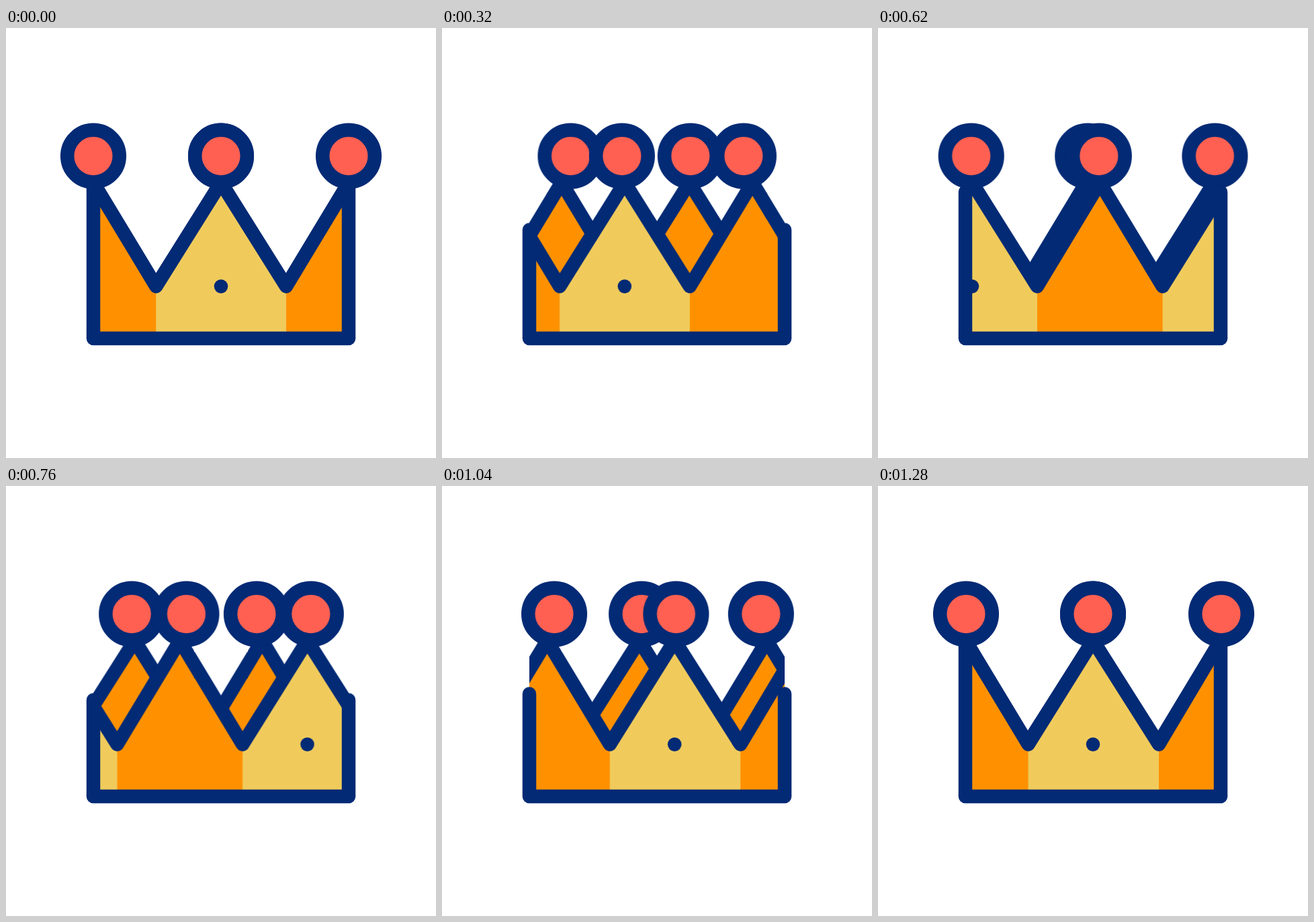
Recreate the animation shown at these times as an HTML page without scripts. Size 640 by 640 pixels, loop 1420 ms.

```html
<!DOCTYPE html>
<html lang="en">
<head>
<meta charset="utf-8">
<title>Turning crown</title>
<style>
  html, body { margin: 0; height: 100%; overflow: hidden; background: #fff; }
  svg { display: block; width: 100%; height: 100%; }
  .line { stroke: #032a75; stroke-width: 20.5; stroke-linecap: round; stroke-linejoin: round; }
  .orange { fill: #ff9100; }
  .yellow { fill: #f0cb5c; }
  .dot { fill: #032a75; }
  .ball { fill: #ff6052; }
  .none { fill: none; }

  /* the turn takes 1280 ms, then the crown rests */
  .band, .wall, .left, .right, .back, .front { animation: 1.42s infinite; }
  .band { animation-name: band; animation-timing-function: cubic-bezier(.43, 0, .57, 1); }
  .left, .right { animation-timing-function: cubic-bezier(.32, 0, .68, 1); }
  .left { animation-name: left; }
  .right { animation-name: right; }
  .back { animation-name: back; }
  .front { animation-name: front; }
  .wall { animation-name: wall; animation-timing-function: linear; }

  @keyframes band {
    from { transform: translateX(0); }
    90.14%, to { transform: translateX(-380px); }
  }
  @keyframes left {
    from { transform: translateX(130px); }
    90.14%, to { transform: translateX(511px); }
  }
  @keyframes right {
    from { transform: translateX(510px); }
    90.14%, to { transform: translateX(131px); }
  }
  /* middle balls leave at one end and come back from the other */
  @keyframes back {
    from { transform: translateX(320px); animation-timing-function: cubic-bezier(.46, 0, .7, .55); }
    45.07% { transform: translateX(510px); }
    45.08% { transform: translateX(130px); animation-timing-function: cubic-bezier(.32, .46, .48, 1); }
    90.14%, to { transform: translateX(320px); }
  }
  @keyframes front {
    from { transform: translateX(320px); animation-timing-function: cubic-bezier(.42, 0, .68, .51); }
    45.07% { transform: translateX(130px); }
    45.08% { transform: translateX(510px); animation-timing-function: cubic-bezier(.32, .49, .58, 1); }
    90.14%, to { transform: translateX(320px); }
  }
  /* side walls follow the silhouette of the points */
  @keyframes wall {
    from { transform: translateY(230px); animation-timing-function: cubic-bezier(.42, 0, .7, .32); }
    31%, 59.14% { transform: translateY(376px); }
    45.07% { transform: translateY(230px); }
    59.14% { animation-timing-function: cubic-bezier(.3, .68, .58, 1); }
    90.14%, to { transform: translateY(230px); }
  }
</style>
</head>
<body>
<svg viewBox="0 0 640 640">
  <defs>
    <clipPath id="sides"><rect x="130" width="380" height="462"/></clipPath>
    <clipPath id="floor"><rect width="640" height="462"/></clipPath>
    <path id="zigzag" d="M34 384.5L130 230L223.3 384.5L320 230L417 384.5L510.3 230L603.6 384.5L700 230L798 384.5L890 230L985 384.5V480H34Z"/>
    <circle id="ball" class="ball line" cy="190.6" r="38.8"/>
  </defs>

  <!-- far side, moving right -->
  <g clip-path="url(#sides)">
    <g transform="matrix(-1 0 0 1 640 0)">
      <use href="#zigzag" class="band orange line"/>
    </g>
  </g>
  <use href="#ball" class="left"/>
  <use href="#ball" class="back"/>

  <!-- near side, moving left -->
  <g clip-path="url(#sides)">
    <g class="band">
      <use href="#zigzag" class="orange"/>
      <path class="yellow" d="M223.3 480V384.5L320 230L417 384.5V480ZM603.6 480V384.5L700 230L798 384.5V480Z"/>
      <use href="#zigzag" class="none line"/>
      <circle class="dot" cx="320" cy="384.6" r="10.3"/>
      <circle class="dot" cx="700" cy="384.6" r="10.3"/>
    </g>
  </g>

  <g clip-path="url(#floor)">
    <path class="wall none line" d="M130 0V300M510 0V300"/>
  </g>
  <path class="none line" d="M130 462.1H510"/>

  <use href="#ball" class="front"/>
  <use href="#ball" class="right"/>
</svg>
</body>
</html>
```
